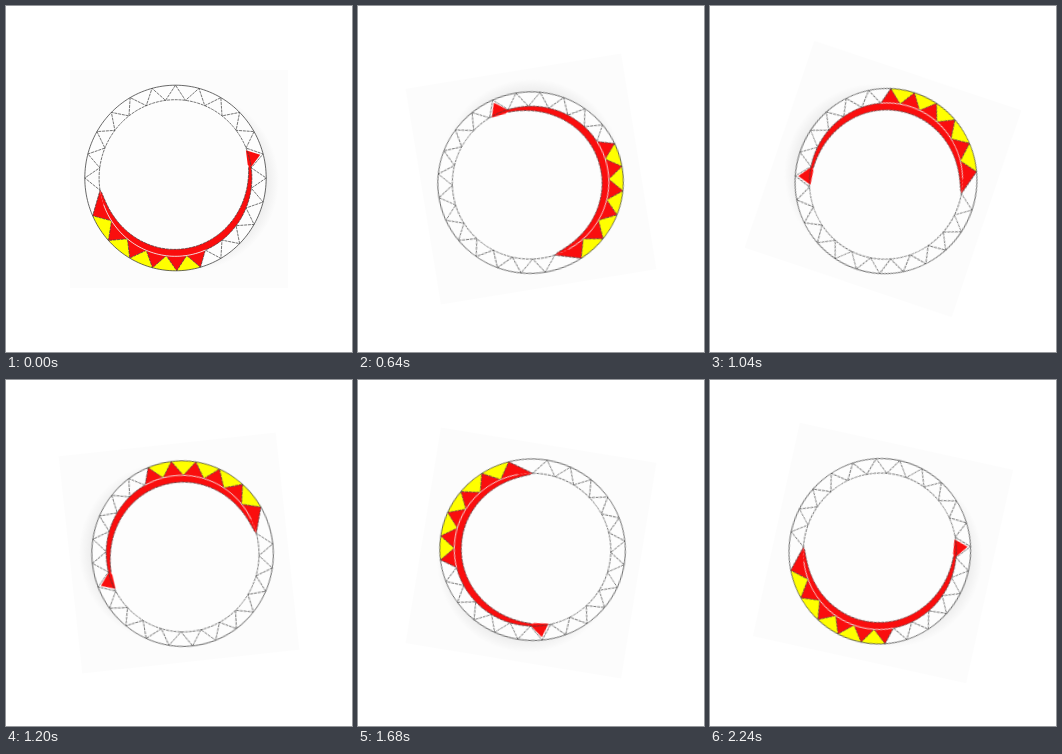
These frames come from a looping animation (346 px wide and 346 px high, 2.32 s). An HTML page:

```html
<!DOCTYPE html>
<html lang="en">
<head>
<meta charset="utf-8">
<title>Rotating ring</title>
<style>
  html, body { margin: 0; width: 100%; height: 100%; overflow: hidden; background: #fff; }
  svg { display: block; width: 346px; height: 346px; }
  #wheel { transform-origin: 173px 173px; animation: spin 2320ms steps(29) infinite; }
  @keyframes spin { to { transform: rotate(-360deg); } }
  .line { fill: none; stroke: #3c3c3c; stroke-width: .7; stroke-dasharray: 3 .8; }
  .rim { fill: none; stroke: #444; stroke-width: .8; }
  .red { fill: #fa0e0e; }
  .yellow { fill: #ff0; }
  .seam { fill: none; stroke: #f3dede; stroke-width: .9; }
</style>
</head>
<body>
<svg viewBox="0 0 346 346">
  <defs>
    <radialGradient id="shade">
      <stop offset=".86" stop-color="#ededed"/>
      <stop offset="1" stop-color="#fcfcfc"/>
    </radialGradient>
  </defs>
  <g id="wheel">
    <rect x="64" y="64" width="218" height="218" fill="#fcfcfc"/>
    <ellipse cx="180" cy="175" rx="93" ry="91" fill="url(#shade)"/>
    <ellipse cx="169.5" cy="172" rx="90.5" ry="92.7" fill="#fdfdfd"/>
    <g id="ring"></g>
  </g>
</svg>
<script>
  const ring = document.getElementById('ring');
  const OUT = [90.7, 92.8], IN = [76.4, 78.3];

  // Angles run clockwise from the top, in degrees.
  const at = (deg, [rx, ry], inset = 0) => {
    const a = deg * Math.PI / 180;
    return [169.5 + (rx - inset) * Math.sin(a), 172 - (ry - inset) * Math.cos(a)];
  };
  const path = (points, cls, close = true) => {
    const el = document.createElementNS('http://www.w3.org/2000/svg', 'path');
    const d = points.map(p => p.map(v => v.toFixed(2)).join(' ')).join('L');
    el.setAttribute('d', 'M' + d + (close ? 'Z' : ''));
    el.setAttribute('class', cls);
    ring.append(el);
  };
  const arc = (from, to, radii, inset = () => 0) => {
    const n = Math.ceil(Math.abs(to - from) / 2);
    return Array.from({ length: n + 1 }, (_, i) => {
      const deg = from + (to - from) * i / n;
      return at(deg, radii, inset(deg));
    });
  };

  // Outer tips of the teeth: the coloured ones, then the plain ones
  const lit = [164, 179.2, 194.7, 210.3, 227.7, 246];
  const plain = Array.from({ length: 17 }, (_, i) => 270 + 15 * i);
  const tips = [...lit, ...plain];
  const mids = tips.map((t, i) => (t + (tips[i + 1] ?? lit[0] + 360)) / 2);
  const start = mids.at(-1) - 360, tail = 261;
  mids[5] = tail;

  // Coloured teeth
  for (let i = 0; i < 5; i++) {
    path([...arc(lit[i], lit[i + 1], OUT), at(mids[i], IN)], 'yellow');
  }
  lit.forEach((t, i) => {
    const from = i ? mids[i - 1] : start;
    path([at(t, OUT), ...arc(mids[i], from, IN)], 'red');
  });

  // Tapered band with its arrowhead
  const depth = deg => 7 * Math.sqrt(Math.max(0, Math.sin(Math.PI * (deg - 74) / 187)));
  path([...arc(78, tail, IN), ...arc(tail, 78, IN, depth)], 'red');
  path([at(69, IN, 1), at(75, OUT, 3), at(82, IN), at(80, IN, 3)], 'red');

  // Outlines
  path(tips.flatMap((t, i) => [at(t, OUT), at(mids[i], IN)]), 'line');
  path(arc(0, 360, OUT), 'rim');
  path(arc(tail, start + 360, IN), 'line', false);
  path(arc(start, 250, IN), 'seam', false);
  path(arc(82, tail, IN, depth), 'line', false);
</script>
</body>
</html>
```
